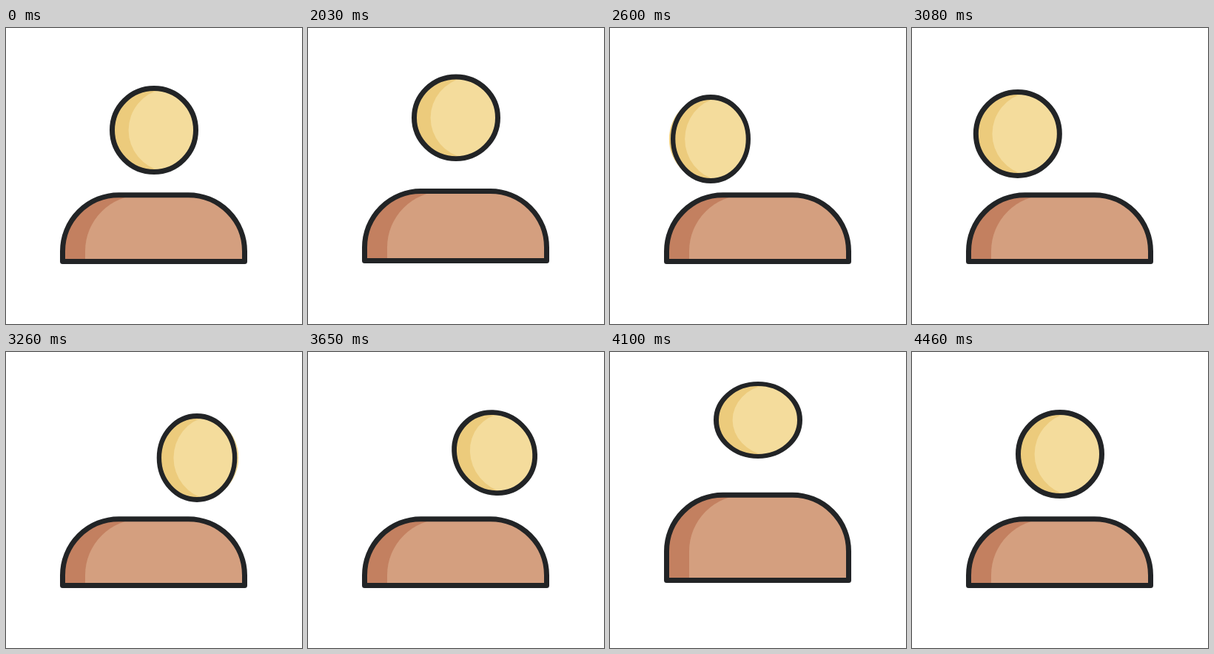
These frames come from a looping animation (400 px wide and 400 px high, 4.55 s). An HTML page:

```html
<!DOCTYPE html>
<html lang="en">
<head>
<meta charset="utf-8">
<title>Person looking around</title>
<style>
  html, body { margin: 0; width: 100%; height: 100%; overflow: hidden; background: #fff; }
  svg { display: block; width: 100%; height: 100%; }
  .line { fill: none; stroke: #222426; stroke-width: 7; stroke-linejoin: round; }
</style>
</head>
<body>
<svg viewBox="0 0 400 400">
  <path id="shade" fill="#c38060"/>
  <path id="light" fill="#d49f7f"/>
  <path id="rim" class="line"/>
  <g id="head">
    <g id="face">
      <circle r="56.5" fill="#eccb7c"/>
      <path d="M11 -55.4A56.5 56.5 0 0 1 11 55.4A56.5 56.5 0 0 1 11 -55.4Z" fill="#f4dc9c"/>
    </g>
    <circle class="line" r="56.5"/>
  </g>
</svg>
<script>
const LOOP = 4550, STEP = 30, PHASE = 20;

const sineInOut = u => (1 - Math.cos(Math.PI * u)) / 2;
const sineOut = u => Math.sin(Math.PI * u / 2);
const cubicOut = u => 1 - (1 - u) ** 3;
const cubicInOut = u => u < 0.5 ? 4 * u ** 3 : 1 - 4 * (1 - u) ** 3;

const span = (t, start, end) => Math.min(1, Math.max(0, (t - start) / (end - start)));
const bump = (t, start, end) => Math.sin(Math.PI * span(t, start, end));

const home = { x: 200, y: 138 }, high = { x: 200, y: 92 };
const left = { x: 139, y: 150 }, right = { x: 259, y: 150 };

// The head flies from place to place; hop lifts the middle of the path.
const moves = [
  { start: 2000, end: 2215, to: high, ease: cubicOut, hop: 0 },
  { start: 2215, end: 2520, to: left, ease: sineInOut, hop: 11 },
  { start: 3020, end: 3320, to: right, ease: cubicInOut, hop: 12 },
  { start: 3530, end: 4070, to: high, ease: sineInOut, hop: 11 },
  { start: 4100, end: 4460, to: home, ease: sineInOut, hop: 0 }
];

function place(t) {
  let { x, y } = home;
  for (const m of moves) {
    const u = span(t, m.start, m.end), e = m.ease(u);
    x += (m.to.x - x) * e;
    y += (m.to.y - y) * e - m.hop * Math.sin(Math.PI * u);
  }
  return { x, y };
}

// How far the shoulders are raised, 0 to 1.
const raised = t =>
  sineOut(span(t, 2000, 2300)) - sineInOut(span(t, 2300, 2540)) +
  sineInOut(span(t, 3700, 4040)) - sineInOut(span(t, 4100, 4400));

function shoulders(x0, top, bottom) {
  const r = 76, x1 = 322.5;
  return `M${x0} ${bottom}V${top + r}A${r} ${r} 0 0 1 ${x0 + r} ${top}` +
    `H${x1 - r}A${r} ${r} 0 0 1 ${x1} ${top + r}V${bottom}Z`;
}

const set = (id, name, value) => document.getElementById(id).setAttribute(name, value);

function draw(t) {
  const lift = raised(t);
  const top = 225.7 - 32.5 * lift, bottom = 315.6 - 7 * lift;
  const outline = shoulders(76.5, top, bottom);
  set("shade", "d", outline);
  set("light", "d", shoulders(107, top, bottom));
  set("rim", "d", outline);

  // Landing on either side presses the head; leaving the top or the right leans it.
  const landing = bump(t, 3200, 3350) - bump(t, 2480, 2720);
  const press = Math.abs(landing);
  const lean = 0.035 * (bump(t, 3530, 3770) - bump(t, 2280, 2520));
  const windUp = 2 * bump(t, 2900, 3040);

  const { x, y } = place(t);
  const sx = 1 - 0.1 * press - Math.abs(lean);
  const sy = 1 - 0.133 * lift - Math.abs(lean);
  set("head", "transform", `matrix(${sx} ${lean} ${lean} ${sy} ${x + 3 * landing - windUp} ${y})`);
  set("face", "transform", `translate(${1.9 * landing} 0) scale(${1 + 0.07 * press} 1)`);
}

function tick() {
  const t = performance.now() % LOOP;
  draw(Math.floor((t - PHASE) / STEP) * STEP + PHASE);
  requestAnimationFrame(tick);
}
tick();
</script>
</body>
</html>
```
